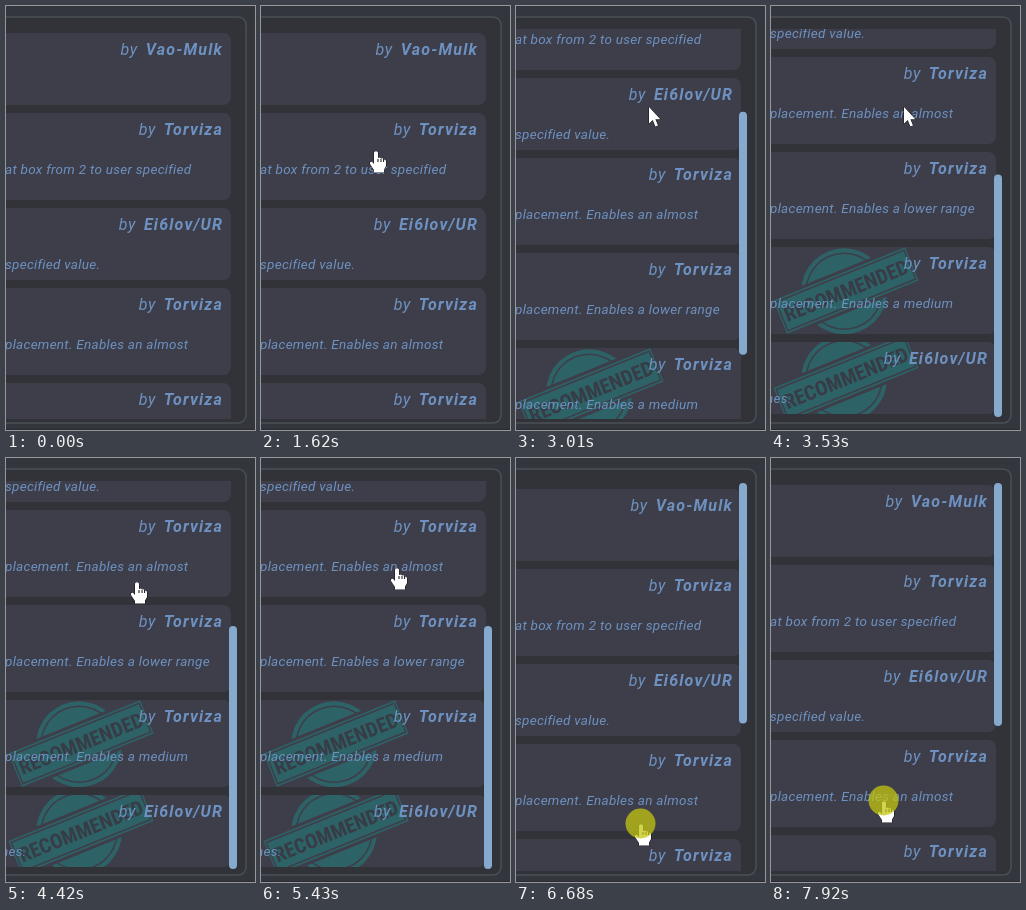
An HTML page with a canvas for the animation above (8000 ms loop, 249x424 px).

```html
<!DOCTYPE html>
<html lang="en">
<head>
<meta charset="utf-8">
<title>Scrolling patch list</title>
<style>
  html, body { margin: 0; width: 100%; height: 100%; overflow: hidden; background: #33363c; }
  canvas { display: block; }
</style>
</head>
<body>
<canvas id="stage" width="249" height="424"></canvas>
<script>
const ctx = document.getElementById('stage').getContext('2d');
const LOOP = 8000, TICK = 126, LEAD = 18;
const VIEW = { top: 23, bottom: 413 };
const MAX_SCROLL = 230, GRAB_Y = 113, OVERPULL = 0.18;
const PAGE = '#33363c', CARD = '#3e3e4a', TEAL = '#2d6266', DARK = '#373c47', INK = '#6d91c0';
const FONT = 'Roboto, "Open Sans", sans-serif';

const cards = [
  { h: 72, by: 'Vao-Mulk', text: '' },
  { h: 87, by: 'Torviza', text: 'at box from 2 to user specified' },
  { h: 72, by: 'Ei6lov/UR', text: 'specified value.' },
  { h: 87, by: 'Torviza', text: 'placement. Enables an almost' },
  { h: 87, by: 'Torviza', text: 'placement. Enables a lower range' },
  { h: 87, by: 'Torviza', text: 'placement. Enables a medium', stamp: true },
  { h: 72, by: 'Ei6lov/UR', text: 'nes.', x: -5, stamp: true }
];
let nextTop = 27;
for (const c of cards) {
  c.top = nextTop;
  nextTop += c.h + 8;
}

// Pointer moves, in ticks; each leg starts where the last one ended.
const enter = { x: 147, y: 388 };
const legs = [
  { from: 8, to: 13, x: 115, y: 145 },
  { from: 13, to: 16, x: 133, y: 101 },
  { from: 33, to: 40, x: 121, y: 218 },
  { from: 40, to: 43, x: 136, y: 110 },
  { from: 44, to: 54.6, x: 124, y: 383 },
  { from: 55, to: 63, x: 113, y: 343 }
];
const SHOW = 8, WHEEL = 19, MOVE_AGAIN = 34, PRESS = 45;

function ease(k, from, to) {
  const u = Math.min(1, Math.max(0, (k - from) / (to - from)));
  return u * u * (3 - 2 * u);
}

function pointerAt(k) {
  let { x, y } = enter;
  for (const leg of legs) {
    const f = ease(k, leg.from, leg.to);
    x += (leg.x - x) * f;
    y += (leg.y - y) * f;
  }
  return { x: Math.round(x), y: Math.round(y) };
}

// Wheel down with a slight overshoot, then the list follows the pressed pointer.
function scrollAt(k, pointer) {
  if (k < PRESS) {
    return Math.round((MAX_SCROLL + 1) * ease(k, WHEEL, 28.22) - ease(k, 28, 30));
  }
  const s = MAX_SCROLL - Math.max(0, pointer.y - GRAB_Y);
  return Math.round(s < 0 ? s * OVERPULL : s);
}

function roundBox(x, y, w, h, r) {
  ctx.beginPath();
  ctx.roundRect(x, y, w, h, r);
}

function disc(x, y, r, color) {
  ctx.fillStyle = color;
  ctx.beginPath();
  ctx.arc(x, y, r, 0, Math.PI * 2);
  ctx.fill();
}

function label(str, x, y, font, align = 'left', spacing = 0) {
  ctx.font = font + ' ' + FONT;
  ctx.letterSpacing = spacing + 'px';
  ctx.textAlign = align;
  ctx.fillStyle = INK;
  ctx.fillText(str, x, y);
  const w = ctx.measureText(str).width;
  ctx.letterSpacing = '0px';
  return w;
}

function drawStamp(cy) {
  ctx.save();
  ctx.translate(75, cy);
  ctx.rotate(-22 * Math.PI / 180);
  disc(-2, 0, 43, TEAL);
  ctx.strokeStyle = CARD;
  ctx.lineWidth = 1.5;
  ctx.beginPath();
  ctx.arc(-2, 0, 38, 0, Math.PI * 2);
  ctx.stroke();
  ctx.fillStyle = CARD;
  ctx.fillRect(-73, -21, 146, 42);
  ctx.fillStyle = TEAL;
  ctx.fillRect(-71, -18, 142, 36);
  ctx.strokeRect(-69, -15.5, 138, 31);

  const word = 'RECOMMENDED';
  const face = 'px "Roboto Condensed", Roboto, sans-serif';
  ctx.fontStretch = 'condensed';
  ctx.font = 'bold 20' + face;
  const size = Math.min(25, 20 * 132 / ctx.measureText(word).width);
  ctx.font = 'bold ' + size + face;
  ctx.textAlign = 'center';
  ctx.fillStyle = DARK;
  ctx.fillText(word, 0, size * 0.356);
  ctx.restore();
}

function drawCard(c, y) {
  ctx.save();
  roundBox(-20, y, 245, c.h, 8);
  ctx.fillStyle = CARD;
  ctx.fill();
  ctx.clip();
  if (c.stamp) drawStamp(y + c.h / 2);
  const w = label(c.by, 217, y + 22, 'italic bold 16px', 'right', 1.2);
  label('by', 217 - w - 8, y + 22, 'italic 16px', 'right', 0.6);
  label(c.text, c.x || -1, y + 60.5, 'italic 13.5px', 'left', 0.28);
  ctx.restore();
}

function drawScrollbar(s) {
  const ratio = 143 / MAX_SCROLL;
  const y = 25 + Math.max(0, s) * ratio;
  const end = 268 + Math.min(MAX_SCROLL, s) * ratio;
  roundBox(223, y, 8, end - y, 4);
  ctx.fillStyle = '#86a9ce';
  ctx.fill();
}

const arrow = new Path2D('M0 0V16.5L3.8 13L6.3 19.5L9 18.4L6.4 12.2H11.3Z');
const hand = new Path2D('M-2 1.5Q0 -1 2 1.5V7Q4 6 5 7.6Q7 6.8 7.6 8.5Q10 8 10 10.5V15L8 18.5V21.5H-2V19L-6 13Q-6.5 10 -4 10.8L-2 13Z');

function drawCursor(p, shape) {
  ctx.save();
  ctx.translate(p.x, p.y);
  ctx.lineJoin = 'round';
  ctx.lineWidth = 1;
  ctx.fillStyle = '#fff';
  ctx.strokeStyle = '#111';
  ctx.stroke(shape);
  ctx.fill(shape);
  if (shape === hand) {
    ctx.beginPath();
    for (const x of [2, 5, 7.6]) {
      ctx.moveTo(x, 8);
      ctx.lineTo(x, 11);
    }
    ctx.stroke();
  }
  ctx.restore();
}

function draw(t) {
  const k = Math.floor((t + LEAD) / TICK);
  const p = pointerAt(k);
  const s = scrollAt(k, p);

  ctx.fillStyle = PAGE;
  ctx.fillRect(0, 0, 249, 424);
  ctx.fillStyle = '#2a2a30';
  ctx.fillRect(0, 423, 249, 1);
  roundBox(-20, 11, 260, 406, 8);
  ctx.fillStyle = '#313339';
  ctx.fill();
  ctx.strokeStyle = '#495056';
  ctx.lineWidth = 1.5;
  ctx.stroke();

  ctx.save();
  ctx.beginPath();
  ctx.rect(0, VIEW.top, 239, VIEW.bottom - VIEW.top);
  ctx.clip();
  for (const c of cards) {
    const y = c.top - s;
    if (y < VIEW.bottom && y + c.h > VIEW.top) drawCard(c, y);
  }
  if (k > WHEEL) drawScrollbar(s);
  ctx.restore();

  if (k < SHOW) return;
  // The pointer shape is not refreshed while only the wheel turns.
  const shownScroll = k < MOVE_AGAIN ? 0 : s;
  const at = p.y + shownScroll;
  const overCard = k >= PRESS || cards.some(c => at >= c.top && at < c.top + c.h);
  drawCursor(p, overCard ? hand : arrow);
  if (k >= PRESS) disc(p.x - 0.5, p.y - 0.5, 15, 'rgba(195, 197, 17, 0.75)');
}

const start = performance.now();
function loop() {
  draw((performance.now() - start) % LOOP);
  requestAnimationFrame(loop);
}
loop();
</script>
</body>
</html>
```
